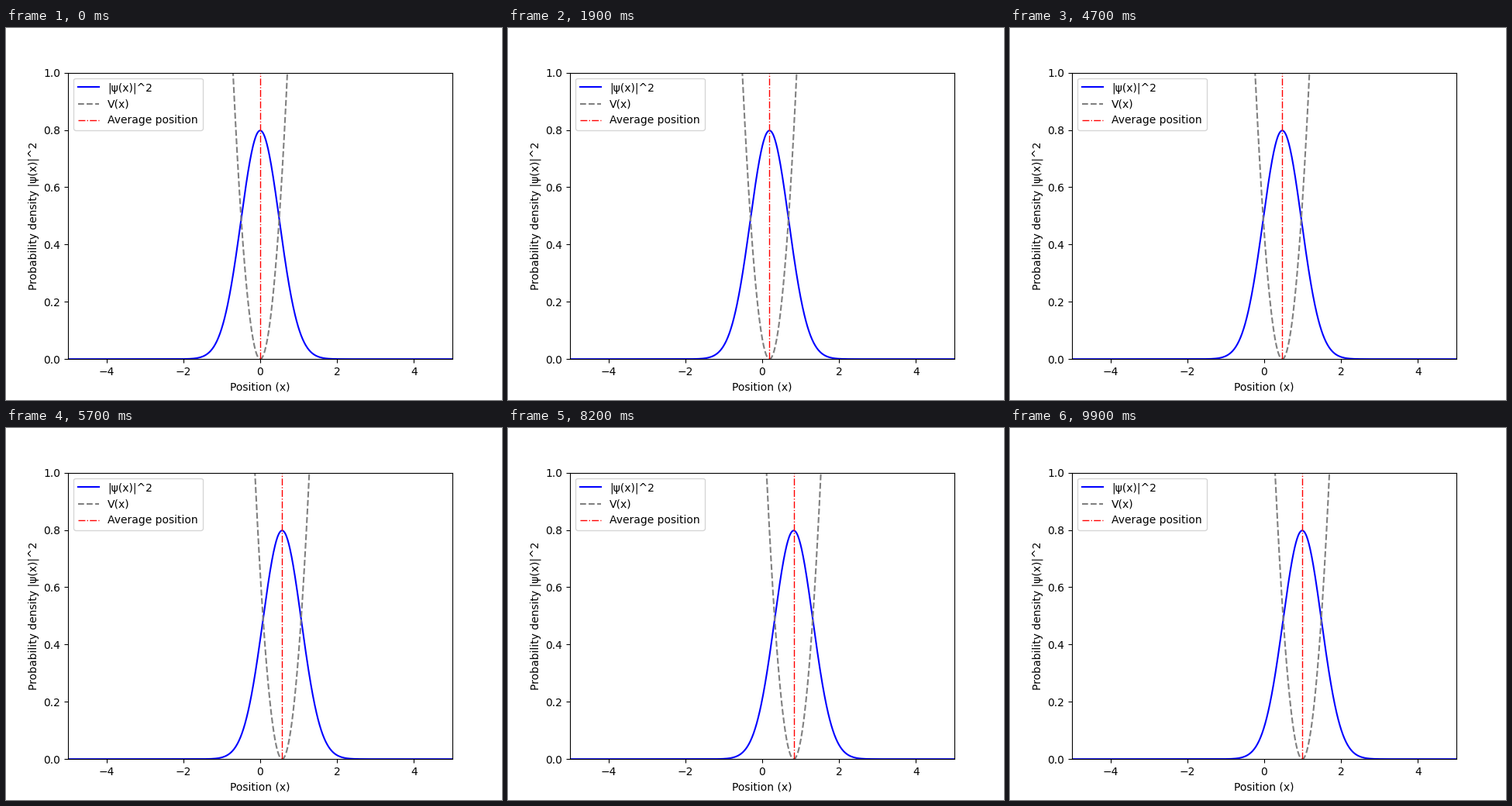
Recreate the animation shown at these times as a matplotlib script. Size 640x480 px, loop 10000 ms.

```python
import numpy as np
import matplotlib.pyplot as plt
from matplotlib.animation import FuncAnimation

FRAMES = 100
STEP = 0.01     # trap displacement per frame
SIGMA = 0.5     # width of the ground state density
STIFFNESS = 4.0

x = np.linspace(-5, 5, 1000)


def density(center):
    norm = SIGMA * np.sqrt(2 * np.pi)
    return np.exp(-(x - center) ** 2 / (2 * SIGMA ** 2)) / norm


def potential(center):
    return 0.5 * STIFFNESS * (x - center) ** 2


fig, ax = plt.subplots(figsize=(6.4, 4.8), dpi=100)
ax.set_xlim(-5, 5)
ax.set_ylim(0, 1)
ax.set_xlabel("Position (x)")
ax.set_ylabel("Probability density |ψ(x)|^2")

psi_line, = ax.plot(x, density(0), color="blue", label="|ψ(x)|^2")
v_line, = ax.plot(x, potential(0), color="gray", ls="--", label="V(x)")
mean_line = ax.axvline(0, color="red", ls="-.", lw=1, label="Average position")
ax.legend(loc="upper left")


def update(i):
    center = STEP * i
    psi_line.set_ydata(density(center))
    v_line.set_ydata(potential(center))
    mean_line.set_xdata([center, center])
    return psi_line, v_line, mean_line


anim = FuncAnimation(fig, update, frames=FRAMES, interval=100, repeat=True)
plt.show()
```
